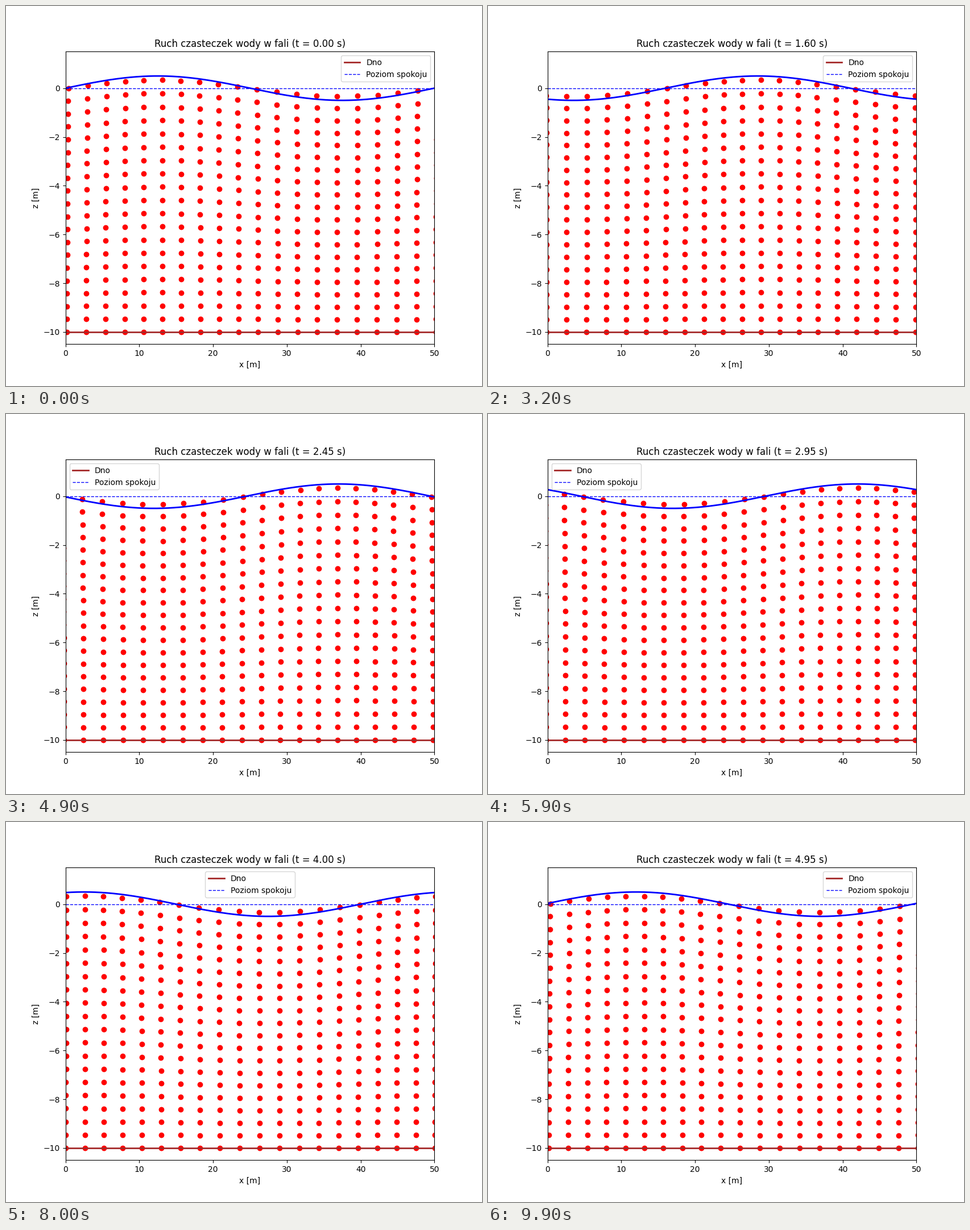
A matplotlib script that plays this animation: 837x669 px, repeating every 10 s.

```python
import numpy as np
import matplotlib.pyplot as plt
from matplotlib.animation import FuncAnimation

AMP = 0.5        # wave amplitude [m]
LENGTH = 50.0    # wavelength [m]
PERIOD = 5.0     # wave period [s]
DEPTH = 10.0     # water depth [m]
G = 9.81
FRAMES = 100

k = 2 * np.pi / LENGTH
omega = 2 * np.pi / PERIOD

x = np.linspace(0, LENGTH, 500)
x0, z0 = np.meshgrid(np.linspace(0, LENGTH, 20), np.linspace(-DEPTH, 0, 20))

# Semi-axes of the particle orbits at finite depth
scale = AMP * G * k / omega**2 / np.cosh(k * DEPTH)
orbit_x = scale * np.cosh(k * (z0 + DEPTH))
orbit_z = scale * np.sinh(k * (z0 + DEPTH))

fig, ax = plt.subplots(figsize=(8.3701, 6.6901), dpi=100)
particles, = ax.plot([], [], "ro")
surface, = ax.plot([], [], "b-", lw=2)
ax.axhline(-DEPTH, color="brown", lw=2, label="Dno")
ax.axhline(0, color="blue", ls="--", lw=1, label="Poziom spokoju")
ax.set_xlim(0, LENGTH)
ax.set_ylim(-DEPTH - 0.5, 1.5)
ax.set_xlabel("x [m]")
ax.set_ylabel("z [m]")
title = ax.set_title("")
ax.legend(loc="best")


def update(i):
    t = i * PERIOD / FRAMES
    phase = k * x0 - omega * t
    particles.set_data((x0 + orbit_x * np.cos(phase)).ravel(),
                       (z0 + orbit_z * np.sin(phase)).ravel())
    surface.set_data(x, AMP * np.sin(k * x - omega * t))
    title.set_text(f"Ruch czasteczek wody w fali (t = {t:.2f} s)")
    return particles, surface, title


anim = FuncAnimation(fig, update, frames=FRAMES, interval=100, repeat=True)
plt.show()
```
